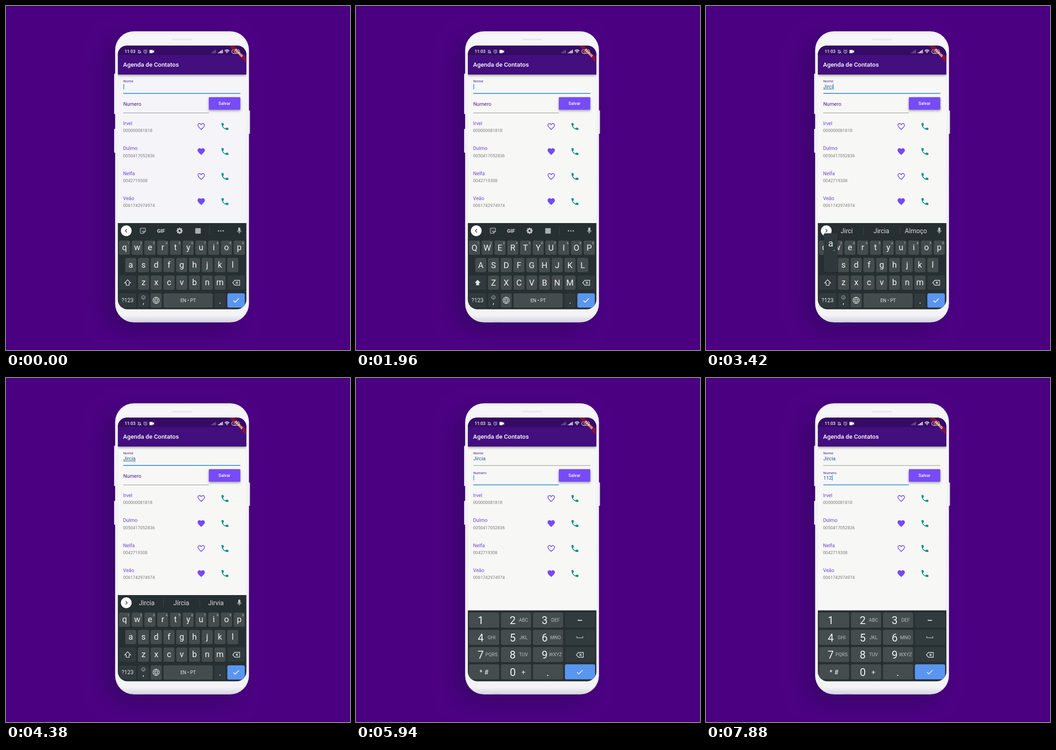
An HTML page with a canvas that plays this animation: 748 px wide and 748 px high, repeating every 8000 ms.

```html
<!DOCTYPE html>
<html lang="pt">
<head>
<meta charset="utf-8">
<title>Agenda</title>
<style>
html, body { margin: 0; height: 100%; overflow: hidden; background: #4b0082; }
canvas { display: block; width: 748px; height: 748px; }
</style>
</head>
<body>
<canvas id="stage" width="748" height="748"></canvas>
<script>
const c = document.getElementById('stage').getContext('2d');
const LOOP = 8000;
const PANEL = '#262f32', KEY = '#454c4e', FN = '#313b3e', LIT = '#666d6f', BLUE = '#5a95f0', INK = '#f1f3f3', DIM = '#c0c5c6';
const VIOLET = '#754bf2', CARET = '#3a8fd2', LABEL = '#4a2090';

// Icons on a 24 unit grid
const ICON = {
  heart: 'M12 21.35l-1.45-1.32C5.4 15.36 2 12.28 2 8.5 2 5.42 4.42 3 7.5 3c1.74 0 3.41.81 4.5 2.09C13.09 3.81 14.76 3 16.5 3 19.58 3 22 5.42 22 8.5c0 3.78-3.4 6.86-8.55 11.54z',
  heartLine: 'M12 20C6 14.7 3 12 3 8.5 3 6 5 4 7.5 4 9.3 4 11.2 5.2 12 6.8 12.8 5.2 14.7 4 16.5 4 19 4 21 6 21 8.5 21 12 18 14.7 12 20z',
  call: 'M6.6 10.8c1.4 2.8 3.8 5.1 6.6 6.6l2.2-2.2c.3-.3.7-.4 1-.2 1.1.3 2.3.5 3.6.5.5 0 1 .5 1 1V20c0 .5-.5 1-1 1C10.6 21 3 13.4 3 4c0-.5.5-1 1-1h3.5c.5 0 1 .5 1 1 0 1.3.2 2.5.6 3.6.1.3 0 .7-.3 1z',
  shift: 'M12 3L3 12.5H7.5V20H16.5V12.5H21z',
  erase: 'M8 5H22V19H8L2 12zM11 9l6 6M17 9l-6 6',
  check: 'M4 12.5l5 5L20 6.5',
  left: 'M14.5 6l-6 6 6 6',
  right: 'M9.5 6l6 6-6 6',
  sticker: 'M14 21H5Q3 21 3 19V5Q3 3 5 3H19Q21 3 21 5V14zM14 21V16Q14 14 16 14H21M8 8v1.5M15 8v1.5M8 13q3 3 6 0',
  globe: 'M12 2a10 10 0 1 0 .01 0M12 2Q3 12 12 22Q21 12 12 2M2.5 9H21.5M2.5 15H21.5',
  smile: 'M12 2a10 10 0 1 0 .01 0M8.5 8v2M15.5 8v2M7 14q5 5 10 0',
  mic: 'M5.5 11a6.5 6.5 0 0 0 13 0M12 18v4',
  bell: 'M4 18H20L17.5 15V10Q17 5 12 5T6.5 10V15zM10 21.5H14M3 3L21 21',
  alarm: 'M12 5a8 8 0 1 0 .01 0M12 9v5l3 2M3 6l4-4M21 6l-4-4',
  video: 'M2 5H16V10L22 6V18L16 14V19H2z',
  signal: 'M2 20v-3M7 20v-6M12 20v-10M17 20v-13M22 20V4',
  wifi: 'M2 9Q12 0 22 9M5.5 13Q12 7 18.5 13M9 16.5Q12 14 15 16.5M12 19v1',
  space: 'M2 9V14H22V9'
};
for (const k in ICON) ICON[k] = new Path2D(ICON[k]);

function rect(x, y, w, h, color, r = 0) {
  c.fillStyle = color;
  c.beginPath();
  c.roundRect(x, y, w, h, r);
  c.fill();
}
function disc(x, y, r, color) {
  rect(x - r, y - r, 2 * r, 2 * r, color, r);
}
function text(s, x, y, size, color, align = 'left', weight = 400) {
  c.font = `${weight} ${size}px Roboto, sans-serif`;
  c.fillStyle = color;
  c.textAlign = align;
  c.fillText(s, x, y);
}
function icon(name, x, y, size, color, line = 0) {
  c.save();
  c.translate(x, y);
  c.scale(size / 24, size / 24);
  c.translate(-12, -12);
  c.fillStyle = c.strokeStyle = color;
  c.lineWidth = line;
  line ? c.stroke(ICON[name]) : c.fill(ICON[name]);
  c.restore();
}
function shaded(color, blur, dx, dy, draw) {
  c.save();
  c.shadowColor = color;
  c.shadowBlur = blur;
  c.shadowOffsetX = dx;
  c.shadowOffsetY = dy;
  draw();
  c.restore();
}
const ramp = (t, a, d) => {
  const p = Math.min(1, Math.max(0, (t - a) / d));
  return p * p * (3 - 2 * p);
};
const mix = (a, b, p) => a + (b - a) * p;
const within = (t, a, b) => t >= a && t < b;

// Typing: [character, popup shown, text inserted, popup hidden]
const NAME = [['J', 2380, 2440, 2480], ['i', 2500, 2560, 2600], ['r', 2620, 2680, 2740],
  ['c', 3000, 3140, 3180], ['i', 3220, 3280, 3340], ['a', 3400, 3460, 3520]];
const DIGITS = [['1', 6740, 6800, 6880], ['1', 7280, 7340, 7400], ['2', 7620, 7680, 7760]];
const WORDS = [[], ['J', 'Já', 'Jogo'], ['Ji', 'Jipe', 'Jiló'], ['Jir', 'Jirau', 'Jipe'],
  ['Jirc', 'Jircia', 'Jarro'], ['Jirci', 'Jircia', 'Almoço'], ['Jircia', 'Jírcia', 'Jirvia']];
const typed = (list, t) => list.filter(k => t >= k[2]).map(k => k[0]).join('');
const pressed = (list, t) => list.find(k => within(t, k[1], k[3]));
const HIDDEN = [[400, 900], [1400, 1900], [4040, 4590], [5080, 5500], [6040, 6560]];
const CONTACTS = [['Irvel', '000000081818'], ['Dulmo', '0050417052836'], ['Nelfa', '0042719308'], ['Veão', '0061742974974']];
const SWAP = 5620, FOCUS = 5475;

function phone() {
  rect(0, 0, 748, 748, '#4b0082');
  shaded('rgba(40,8,85,.6)', 48, -20, 16, () => rect(240, 60, 284, 626, '#eeeef4', 40));
  for (const [x, y, h] of [[235, 147, 88], [235, 267, 52], [526, 227, 51]]) rect(x, y, 4.5, h, '#e3e2ee', 1.5);
  const g = c.createLinearGradient(0, 55, 0, 688);
  [[0, '#e9e9f0'], [.012, '#f6f6f8'], [.5, '#f0eff6'], [.975, '#f4f4f7'], [1, '#d3d2e0']].forEach(s => g.addColorStop(...s));
  rect(237.3, 55, 291, 633, g, 41);
  rect(361, 71.5, 44, 3, '#e5e5eb', 1.5);
  rect(299, 686, 18, 1.6, '#c9c6da', 1);
}

function header() {
  shaded('rgba(0,0,0,.4)', 5, 0, 2, () => rect(243, 86, 280, 63, '#430e7e'));
  rect(243, 86, 280, 20.5, '#350b64');
  text('11:03', 258, 102, 9.3, '#fff', 'left', 500);
  icon('bell', 290, 99, 10, '#e8e2f0', 2.2);
  icon('alarm', 303, 99, 10, '#e8e2f0', 2.4);
  icon('video', 317, 99, 12, '#fff');
  icon('signal', 451, 99, 11, '#78619a', 3.2);
  icon('signal', 466, 99, 11, '#fff', 3.4);
  icon('wifi', 480.5, 99, 12, '#fff', 2.8);
  c.strokeStyle = '#e9dfd0';
  c.lineWidth = 1.2;
  c.beginPath();
  c.roundRect(491, 94.7, 17, 8.6, 4.3);
  c.stroke();
  text('100', 499.5, 101.5, 6.5, '#f0dfb8', 'center', 700);
  text('Agenda de Contatos', 254.5, 132, 13.35, '#fff', 'left', 500);
  c.save();
  c.translate(522.5, 86);
  c.rotate(Math.PI / 4);
  rect(-40, 18.6, 80, 8.4, 'rgba(160,24,32,.66)');
  text('DEBUG', 0, 25.3, 6.9, '#fff', 'center', 900);
  c.restore();
}

function form(t) {
  const name = typed(NAME, t), digits = typed(DIGITS, t), move = ramp(t, FOCUS, 200);
  const onName = t < 5510;
  text('Nome', 255, 166, 8.1, LABEL);
  rect(255, 189.7, 254.5, 1, '#8d8d8d');
  c.globalAlpha = 1 - move;
  rect(255, 189.2, 254.5, 1.7, CARET);
  c.globalAlpha = 1;
  text('Numero', 255, mix(216.5, 208.5, move), mix(11, 8.1, move), LABEL);
  rect(255, 232, 186, 1, '#8d8d8d');
  c.globalAlpha = move;
  rect(255, 231.5, 186, 1.7, CARET);
  c.globalAlpha = 1;

  text(name, 255, 179, 11, '#225896');
  const nameWidth = c.measureText(name).width;
  if (name && onName) rect(255, 180.3, nameWidth, .9, '#225896');
  text(digits, 255, 221, 11, '#225896');
  const width = onName ? nameWidth : c.measureText(digits).width;
  if (!HIDDEN.some(h => within(t, ...h))) rect(255.3 + width, onName ? 169.8 : 211.3, 1.5, 11.5, CARET);

  shaded('rgba(0,0,0,.35)', 5, 0, 2.5, () => rect(441, 198.3, 68.5, 27.3, '#774bf6', 1.5));
  text('Salvar', 475, 215, 9.3, '#fff', 'center', 500);
}

function contacts() {
  CONTACTS.forEach(([name, number], i) => {
    const y = 261.5 + i * 54.4;
    text(name, 254.5, y - 2.5, 10.8, '#7046d4');
    text(number, 254.5, y + 12.6, 9.46, '#7c7c7c');
    i % 2 ? icon('heart', 424.5, y + .5, 19.2, VIOLET) : icon('heartLine', 424.5, y + .5, 19.2, VIOLET, 2);
    icon('call', 476, y + .5, 20, '#078f80');
  });
}

function strip(words) {
  disc(261.5, 488.7, 11.7, '#fff');
  icon(words.length ? 'right' : 'left', 261.5, 488.7, 14, '#30383b', 2.4);
  rect(505, 481.5, 4.6, 9, DIM, 2.3);
  icon('mic', 507.3, 488.5, 15, DIM, 1.9);
  if (words.length) {
    words.forEach((w, i) => text(w, 306 + i * 75.2, 494, 14, '#dce0e0', 'center'));
    for (const x of [342, 421]) rect(x, 480, 1, 17, '#3c4548');
    return;
  }
  icon('sticker', 297.7, 488.7, 15, DIM, 2);
  text('GIF', 337, 493, 11.5, DIM, 'center', 900);
  for (let i = 0; i < 8; i++) {
    c.save();
    c.translate(377.5, 488.7);
    c.rotate(i * Math.PI / 4);
    rect(-1.5, -6.8, 3, 4, DIM, .6);
    c.restore();
  }
  disc(377.5, 488.7, 5.2, DIM);
  disc(377.5, 488.7, 2.2, PANEL);
  rect(411.5, 483, 12, 12, '#a9afb1', 1);
  rect(442, 480, 1, 17, '#3c4548');
  for (const x of [462, 467.2, 472.4]) disc(x, 489, 1.4, DIM);
}

const ROWS = [['qwertyuiop', 257.6, 525.5], ['asdfghjkl', 271.2, 563.2], ['zxcvbnm', 299, 601.6]];

function letters(t) {
  const name = typed(NAME, t), caps = within(t, 1820, NAME[0][2]), hit = pressed(NAME, t);
  rect(243, 472, 280, 188, PANEL);
  strip(WORDS[name.length]);
  let pop;
  ROWS.forEach(([keys, x0, y], row) => [...keys].forEach((k, i) => {
    const x = x0 + i * 27.72;
    rect(x - 12, y - 15.5, 24, 31, KEY, 3.5);
    text(caps ? k.toUpperCase() : k, x, y + (caps ? 6.7 : 5.7), 18.3, INK, 'center');
    if (!row) text((i + 1) % 10, x + 8.4, y - 7.3, 7, DIM, 'center');
    if (hit && hit[0].toLowerCase() === k) pop = [x, y];
  }));
  rect(246, 586, 37, 31, FN, 3.5);
  icon('shift', 264.5, 601.7, 17, '#dfe3e3', caps ? 0 : 1.9);
  rect(481.5, 586, 38, 31, FN, 3.5);
  icon('erase', 500.5, 601.7, 18, '#dfe3e3', 1.8);
  rect(246, 624.7, 37, 31, FN, 3.5);
  text('?123', 264.3, 644.2, 12.2, '#dfe3e3', 'center');
  rect(287, 624.7, 24, 31, FN, 3.5);
  icon('smile', 298.7, 633.7, 9.5, '#dfe3e3', 2);
  text(',', 298.8, 647.5, 16, INK, 'center');
  rect(314.5, 624.7, 24, 31, KEY, 3.5);
  icon('globe', 326.5, 640, 16.5, '#d5d9d9', 1.6);
  rect(342.5, 624.7, 107, 31, KEY, 3.5);
  text('EN • PT', 396, 643.7, 10.1, '#e4e7e7', 'center');
  rect(453.5, 624.7, 24, 31, FN, 3.5);
  text('.', 465.5, 647, 18, INK, 'center');
  rect(481.3, 624.7, 38, 31, BLUE, 3.5);
  icon('check', 500.4, 640, 18, '#fff', 1.9);
  if (pop) {
    const [x, y] = pop;
    shaded('rgba(0,0,0,.3)', 3, 0, 1, () => rect(x - 15, y - 69, 30, 84, '#2f393c', 3));
    text(hit[0], x, y - 40, 20, INK, 'center');
    text('…', x + 7.5, y - 31, 9, INK, 'center');
  }
}

const HINTS = ['', 'ABC', 'DEF', 'GHI', 'JKL', 'MNO', 'PQRS', 'TUV', 'WXYZ'];

function numbers(t) {
  const hit = pressed(DIGITS, t);
  rect(243, 505.3, 280, 155, PANEL);
  for (let row = 0; row < 4; row++) for (let col = 0; col < 4; col++) {
    const x = 245.7 + col * 69.5, y = 510 + row * 37.5, n = row * 3 + col;
    const digit = col < 3 && row < 3 ? String(n + 1) : '';
    const lit = hit && digit === hit[0];
    rect(x, y, 65.7, 32.7, col === 3 ? (row === 3 ? BLUE : FN) : lit ? LIT : KEY, 3.5);
    if (!digit) continue;
    text(digit, x + 25.5, y + 25, 23, INK, 'center');
    text(HINTS[n], x + 49, y + 20, 10.4, '#b8bdbe', 'center');
  }
  text('* #', 278.3, 645, 15, INK, 'center');
  text('0', 341, 647.5, 23, INK, 'center');
  text('+', 364, 645, 15, INK, 'center');
  text('.', 417, 647.5, 23, INK, 'center');
  rect(482, 526, 9.5, 1.7, INK);
  icon('space', 486.7, 563.5, 16, DIM, 1.9);
  icon('erase', 486.7, 602, 18, '#dfe3e3', 1.8);
  icon('check', 486.7, 639.3, 18, '#fff', 1.9);
}

function draw(t) {
  const p = ramp(t, 20, 780);
  phone();
  c.save();
  c.beginPath();
  c.roundRect(243.2, 86, 279.5, 573.5, [20, 20, 21, 21]);
  c.clip();
  rect(243, 86, 280, 574, `rgb(${mix(245, 247, p)},${mix(244, 247, p)},${mix(249, 246, p)})`);
  header();
  form(t);
  contacts();
  t < SWAP ? letters(t) : numbers(t);
  c.restore();
}

function tick(now) {
  draw(now % LOOP);
  requestAnimationFrame(tick);
}
draw(0);
requestAnimationFrame(tick);
</script>
</body>
</html>
```
